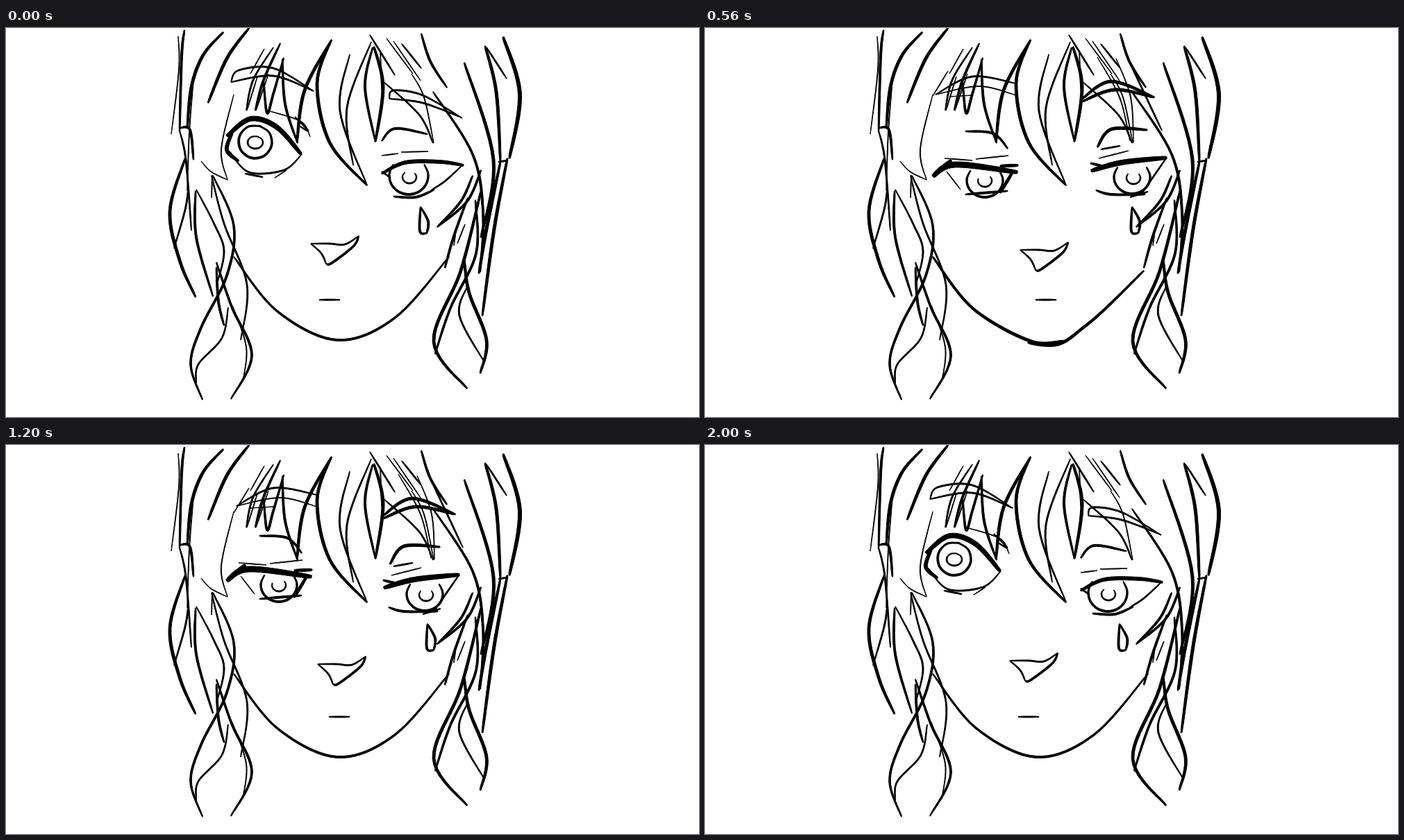
These frames come from a looping animation (998x561 px, 2160 ms). An HTML page:

```html
<!DOCTYPE html>
<html lang="en">
<head>
<meta charset="utf-8">
<title>Head turn</title>
<style>
html, body { margin: 0; width: 100%; height: 100%; overflow: hidden; background: #fff; }
svg { display: block; width: 100%; height: 100%; }
path { stroke: #000; stroke-width: 1; stroke-linejoin: round; }
</style>
</head>
<body>
<svg id="stage" viewBox="0 0 998 561"></svg>
<script>
const NS = 'http://www.w3.org/2000/svg';
const stage = document.getElementById('stage');
let layer = stage;

function add(parent, tag, attrs) {
  const el = document.createElementNS(NS, tag);
  for (const key in attrs) el.setAttribute(key, attrs[key]);
  return parent.appendChild(el);
}

const spline = (a, b, c, d, t) =>
  b + t / 2 * (c - a + t * (2 * a - 5 * b + 4 * c - d + t * (3 * (b - c) + d - a)));

// A smooth brush line through the given points, thinner at both ends.
function pen(width, ...xy) {
  const last = xy.length / 2 - 1, steps = 10, total = last * steps;
  const at = (i, k) => xy[2 * Math.max(0, Math.min(last, i)) + k];
  const pts = Array.from({ length: total + 1 }, (_, n) => {
    const i = Math.min(Math.floor(n / steps), last - 1), t = n / steps - i;
    return [0, 1].map(k => spline(at(i - 1, k), at(i, k), at(i + 1, k), at(i + 2, k), t));
  });
  const left = [], right = [];
  pts.forEach(([x, y], n) => {
    const p = pts[Math.max(0, n - 1)], q = pts[Math.min(total, n + 1)];
    const dx = q[0] - p[0], dy = q[1] - p[1], len = Math.hypot(dx, dy) || 1;
    const w = width * (0.55 + 0.45 * Math.sqrt(Math.sin(Math.PI * n / total) + 1e-9));
    const h = Math.max(0.1, (w - 1) / 2);
    left.push([x - dy / len * h, y + dx / len * h]);
    right.unshift([x + dy / len * h, y - dx / len * h]);
  });
  const d = left.concat(right).map(p => p.map(v => v.toFixed(1)).join(' ')).join('L');
  add(layer, 'path', { d: `M${d}Z` });
}

// Part of an ellipse, angles in degrees clockwise from the right.
function arc(width, cx, cy, rx, ry, from, to) {
  const xy = [];
  for (let i = 0; i <= 8; i++) {
    const a = (from + (to - from) * i / 8) * Math.PI / 180;
    xy.push(cx + rx * Math.cos(a), cy + ry * Math.sin(a));
  }
  pen(width, ...xy);
}

const ring = (width, cx, cy, rx, ry) => arc(width, cx, cy, rx, ry, -80, 290);
const pupil = (cx, cy, from = 200) => arc(3, cx, cy, 10, 9, from, -40);
// An iris whose top is hidden by the lid.
const cutIris = (cx, cy, rx, ry) => arc(4, cx, cy, rx, ry, 217, -37);

function hairLeft() {
  pen(2, 248, 12, 249, 60, 238, 153);
  pen(4, 257, 3, 253, 40, 250, 150);
  pen(3, 250, 148, 259, 190, 267, 292);
  pen(5, 258, 188, 236, 264, 250, 335, 273, 388);
  pen(3, 262, 235, 258, 262, 242, 318);
  pen(4, 251, 144, 265, 147, 270, 190);
  pen(5, 313, 6, 284, 39, 267, 85, 261, 145);
  pen(2, 270, 75, 264, 150, 261, 235);
  pen(5, 350, 0, 318, 44, 291, 108);
  pen(2, 328, 96, 310, 175, 319, 219);
  pen(2, 319, 219, 295, 207, 281, 192);
}

function curlsLeft() {
  pen(4, 273, 235, 274, 302, 298, 387);
  pen(3, 274, 233, 300, 283, 314, 322, 303, 372);
  pen(3, 296, 213, 314, 282, 347, 370, 338, 450);
  pen(4, 298, 213, 328, 285, 318, 357, 281, 432, 266, 485, 283, 536);
  pen(4, 303, 338, 325, 402, 354, 472, 324, 535);
  pen(4, 303, 345, 306, 395, 314, 429);
  pen(3, 320, 403, 311, 447, 277, 485, 274, 512);
  pen(2, 326, 400, 346, 460, 341, 510);
  pen(2, 297, 212, 296, 245);
}

function bangsLeft() {
  pen(2, 372, 30, 352, 66);
  pen(3, 385, 28, 356, 75, 346, 119);
  pen(2, 347, 119, 362, 70);
  pen(4, 395, 22, 371, 75, 359, 119);
  pen(2, 360, 119, 378, 66);
  pen(4, 400, 43, 385, 95, 376, 123, 371, 77);
  pen(4, 398, 45, 402, 110, 420, 166);
  pen(5, 469, 17, 430, 90, 419, 165);
}

function bangsMiddle() {
  pen(5, 468, 18, 448, 80, 466, 165, 520, 227);
  pen(3, 495, 38, 481, 120, 520, 227);
  pen(3, 526, 20, 491, 115, 500, 198);
  pen(4, 528, 28, 517, 85, 532, 164);
  pen(5, 532, 164, 543, 85, 530, 27);
  pen(2, 539, 32, 541, 88);
}

function bangsRight() {
  pen(3, 524, 10, 560, 68);
  pen(2, 548, 15, 586, 66);
  pen(2, 558, 19, 597, 76);
  pen(3, 570, 23, 598, 58);
  pen(4, 598, 8, 611, 48, 635, 86);
  pen(3, 543, 77, 595, 125, 615, 166);
  pen(2, 584, 66, 602, 100, 616, 166);
}

function hairRight() {
  pen(4, 615, 92, 672, 182, 687, 265, 683, 352);
  pen(5, 660, 50, 702, 190, 684, 302);
  pen(5, 690, 26, 706, 92, 712, 192);
  pen(3, 692, 28, 721, 73);
  pen(6, 716, 13, 740, 95, 725, 188);
  pen(3, 709, 193, 723, 191);
  pen(5, 712, 193, 692, 290, 681, 354);
  pen(5, 722, 188, 703, 290, 686, 415);
  pen(4, 672, 213, 655, 250, 621, 287);
  pen(4, 684, 205, 664, 250, 621, 287);
}

function curlsRight() {
  pen(5, 684, 235, 655, 350, 616, 452, 664, 520);
  pen(4, 676, 248, 677, 325, 640, 404, 618, 470);
  pen(5, 660, 335, 667, 382, 692, 450, 683, 498);
  pen(3, 664, 373, 653, 415, 689, 482);
  pen(4, 665, 245, 645, 300, 632, 346);
  pen(2, 648, 290, 645, 314);
  pen(2, 661, 283, 650, 311);
}

function strands() {
  pen(2, 350, 62, 328, 98);
  pen(2, 592, 44, 613, 100, 617, 165);
  pen(2, 565, 42, 597, 100, 612, 163);
  pen(3, 610, 46, 658, 148);
}

const thinJaw = () => pen(4, 328, 330, 390, 408, 477, 450, 560, 418, 638, 330);

function thickJaw() {
  pen(5, 328, 330, 390, 408, 490, 457, 550, 428, 632, 350);
  pen(7, 465, 453, 490, 456, 518, 452);
}

function nose() {
  pen(3, 439, 311, 466, 311, 488, 312, 508, 300);
  pen(4, 508, 300, 500, 315, 469, 339, 461, 340);
  pen(3, 461, 340, 454, 325, 439, 311);
}

const mouth = () => pen(3, 451, 392, 481, 392);

function tear() {
  pen(4, 597, 258, 608, 279, 606, 296);
  pen(4, 606, 296, 596, 293, 597, 258);
}

const brows = {
  upLeft() {
    pen(3, 324, 78, 335, 61, 385, 58, 443, 91);
    pen(3, 443, 91, 385, 69, 324, 78);
  },
  archLeft() {
    pen(4, 344, 67, 385, 53, 452, 87);
    pen(4, 344, 67, 400, 64, 452, 88);
  },
  lowLeft() {
    pen(3, 328, 113, 350, 95, 400, 89, 445, 106);
    pen(3, 328, 113, 380, 102, 437, 117);
    pen(3, 337, 100, 366, 92, 440, 105);
  },
  softLeft() {
    pen(3, 332, 96, 385, 70, 448, 80);
    pen(2, 332, 96, 395, 84, 448, 97);
    pen(1.5, 352, 99, 385, 97);
  },
  lowRight() {
    pen(3, 552, 102, 558, 90, 600, 97, 657, 130);
    pen(3, 656, 129, 600, 108, 552, 102);
  },
  midRight() {
    pen(5, 543, 102, 585, 77, 647, 100);
    pen(5, 543, 106, 590, 89, 647, 100);
  },
  upRight() {
    pen(5, 545, 81, 595, 57, 654, 68);
    pen(5, 548, 86, 600, 67, 654, 68);
    pen(5, 545, 76, 549, 87);
  }
};

const eyes = {
  wideLeft() {
    pen(8, 318, 156, 352, 131, 390, 143, 425, 182);
    pen(6, 326, 150, 318, 176, 335, 192);
    pen(3, 322, 178, 350, 208, 400, 205, 426, 182);
    pen(3, 344, 210, 370, 215);
    pen(2, 387, 216, 404, 205);
    ring(4, 359, 164, 24, 24);
    ring(3, 359, 165, 11, 9);
    pen(2, 380, 120, 425, 135, 438, 157);
    pen(3, 416, 128, 435, 148, 422, 141);
  },
  lashLeft() {
    pen(14, 327, 167, 350, 150, 390, 150, 424, 178);
    [318, 330, 345, 363].forEach((x, i) => pen(4, x, 154 - i * 7, x + 20, 157 - i * 4));
    pen(4, 317, 168, 334, 156);
    pen(3, 318, 167, 337, 189);
    pen(5, 335, 194, 375, 214, 412, 208, 422, 177);
    pen(5, 358, 223, 402, 215);
    ring(5, 365, 173, 23, 21);
    pupil(366, 172);
    pen(4, 400, 122, 425, 132, 438, 157);
  },
  calmLeft() {
    pen(2, 373, 148, 412, 147);
    pen(3, 417, 140, 438, 160, 417, 140);
    pen(2, 343, 188, 390, 190);
    pen(2, 392, 187, 437, 185);
    pen(9, 330, 213, 360, 197, 440, 202);
    pen(3, 436, 200, 462, 199);
    pen(8, 333, 210, 355, 191);
    pen(7, 439, 203, 430, 235);
    pen(2, 348, 207, 360, 228, 385, 237);
    pen(4, 374, 241, 432, 235);
    cutIris(407, 219, 23, 21);
    pupil(412, 221);
  },
  halfLeft() {
    pen(4, 375, 149, 415, 152, 436, 174);
    pen(2, 345, 188, 385, 191);
    pen(2, 390, 189, 437, 184);
    pen(9, 328, 214, 360, 197, 450, 208);
    pen(5, 425, 199, 451, 198);
    pen(7, 334, 208, 355, 191);
    pen(5, 444, 206, 425, 238);
    pen(2, 348, 207, 368, 233);
    pen(4, 375, 240, 436, 235);
    cutIris(403, 220, 26, 24);
    pupil(403, 220);
  },
  softRight() {
    pen(4, 541, 163, 560, 145, 607, 153);
    pen(2, 541, 184, 565, 181);
    pen(2, 569, 179, 608, 178);
    pen(6, 541, 210, 575, 194, 625, 193, 659, 198);
    pen(3, 656, 199, 632, 221, 612, 234);
    pen(3, 541, 207, 554, 216);
    cutIris(580, 213, 28, 27);
    pupil(581, 215, 230);
    pen(4, 558, 243, 590, 244, 617, 233);
  },
  heavyRight() {
    pen(6, 543, 165, 565, 137, 610, 134, 648, 150);
    pen(3, 553, 183, 602, 164);
    pen(8, 540, 192, 590, 186, 663, 184);
    pen(13, 596, 186, 630, 182, 661, 183);
    pen(3, 661, 185, 635, 217, 610, 235);
    pen(5, 562, 192, 543, 220, 540, 237);
    cutIris(584, 210, 28, 24);
    pupil(583, 209, 230);
    pen(4, 555, 240, 613, 245);
    pen(4, 590, 247, 611, 238);
  },
  wideRight() {
    pen(4, 560, 156, 580, 146, 636, 144);
    pen(2, 561, 157, 598, 146);
    pen(8, 552, 205, 575, 181, 610, 168, 650, 173);
    pen(3, 551, 197, 554, 218);
    pen(6, 638, 178, 657, 209, 640, 232);
    pen(3, 550, 214, 585, 242, 632, 238, 656, 209);
    pen(2, 548, 218, 588, 249);
    pen(2, 614, 250, 632, 242);
    ring(4, 615, 200, 23, 22);
    pupil(617, 200);
  },
  halfRight() {
    pen(5, 565, 172, 585, 146, 637, 147);
    pen(3, 570, 175, 598, 170);
    pen(2, 567, 188, 610, 177);
    pen(8, 556, 206, 600, 194, 665, 187);
    pen(4, 555, 195, 576, 200);
    pen(3, 664, 188, 628, 240);
    pen(4, 563, 234, 585, 240, 634, 240);
    pen(3, 612, 244, 638, 236);
    cutIris(615, 215, 26, 24);
    pupil(617, 216, 220);
  }
};

// Parts of each pose: a drawing, then an optional shift.
const poses = {
  left: [[thinJaw], [brows.upLeft], [brows.lowRight], [eyes.wideLeft], [eyes.softRight],
    [nose], [mouth], [tear]],
  leaving: [[thinJaw], [strands], [brows.archLeft], [brows.midRight], [eyes.lashLeft],
    [eyes.heavyRight], [nose, 6, 1], [mouth, 4, 0], [tear, 2, 0]],
  middle: [[thinJaw], [strands], [brows.softLeft, 0, -8], [brows.midRight], [eyes.halfLeft, -10, -18],
    [eyes.halfRight, -12, 0], [nose, 10, 5], [mouth, 14, 0], [tear, 10, 0]],
  arriving: [[thickJaw], [strands], [brows.softLeft], [brows.midRight], [eyes.halfLeft],
    [eyes.halfRight], [nose, 15, 9], [mouth, 25, 0], [tear, 18, 0]],
  right: [[thickJaw], [strands], [brows.lowLeft], [brows.upRight], [eyes.calmLeft],
    [eyes.wideRight], [nose, 19, 4], [mouth, 26, -2], [tear, 20, -4]]
};

const LOOP = 2160;
const timeline = [
  [0, 'left'], [40, 'leaving'], [120, 'middle'], [200, 'arriving'], [280, 'right'],
  [560, 'arriving'], [640, 'middle'], [680, 'leaving'], [760, 'left'],
  [1120, 'leaving'], [1200, 'middle'], [1280, 'arriving'], [1360, 'right'],
  [1800, 'arriving'], [1880, 'middle'], [1920, 'leaving'], [2000, 'left']
];

[hairLeft, curlsLeft, bangsLeft, bangsMiddle, bangsRight, hairRight, curlsRight].forEach(draw => draw());

for (const [name, parts] of Object.entries(poses)) {
  const face = add(stage, 'g');
  for (const [draw, dx = 0, dy = 0] of parts) {
    layer = add(face, 'g', { transform: `translate(${dx} ${dy})` });
    draw();
  }
  const frames = timeline.map(([time, pose]) => ({
    offset: time / LOOP, opacity: pose === name ? 1 : 0, easing: 'step-end'
  }));
  frames.push({ offset: 1, opacity: name === 'left' ? 1 : 0 });
  face.animate(frames, { duration: LOOP, iterations: Infinity });
}
</script>
</body>
</html>
```
